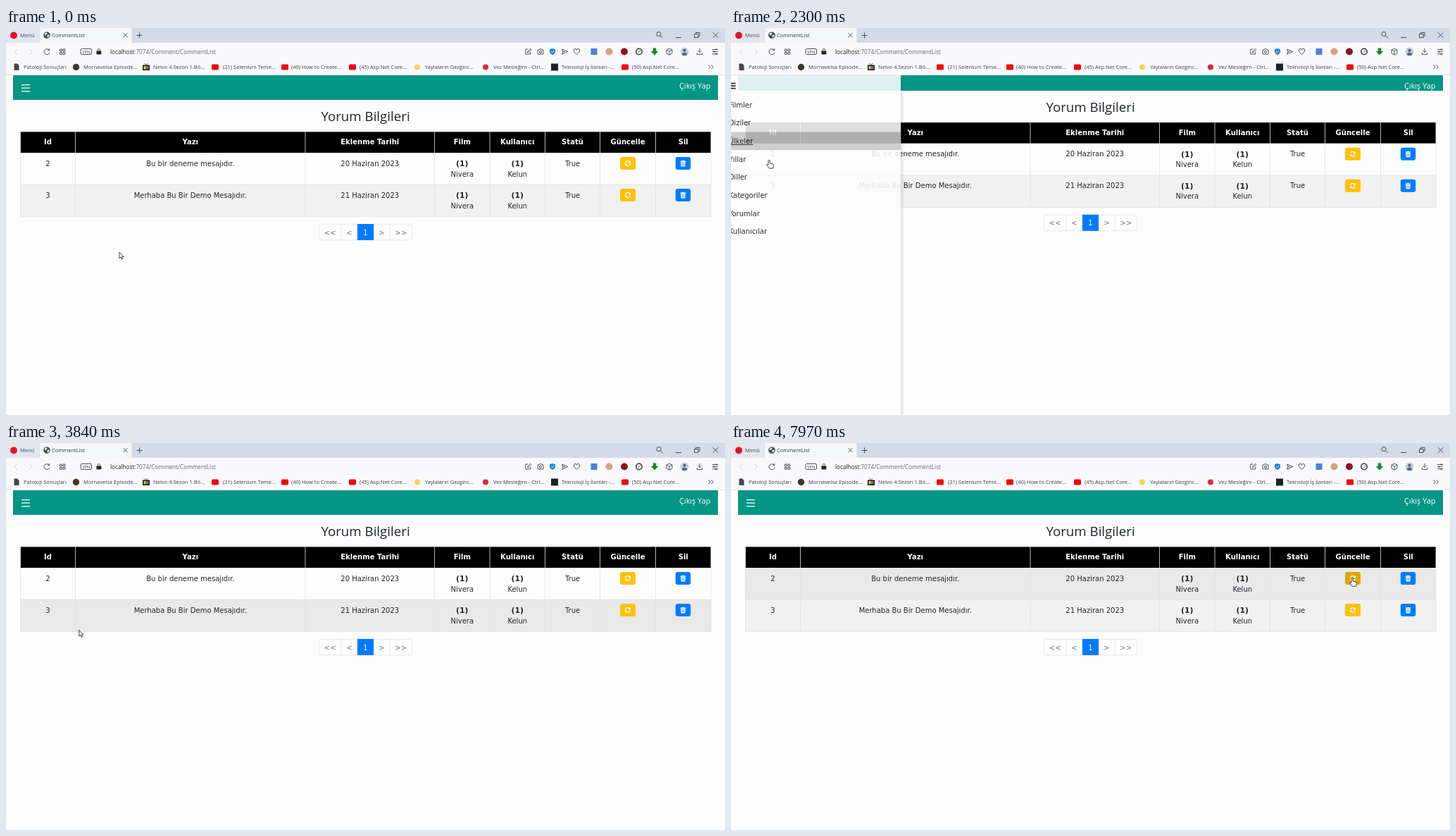
Write an HTML page that moves like this. It is 1021 px wide and 549 px high and loops after 8 s.

```html
<!DOCTYPE html>
<html lang="tr">
<head>
<meta charset="utf-8">
<title>CommentList</title>
<style>
html, body { margin: 0; width: 100%; height: 100%; overflow: hidden; background: #fdfdfd; }
svg { display: block; width: 1021px; height: 549px; }
.ui { font-family: "Open Sans", "Noto Sans", sans-serif; }
.page { font-family: "DejaVu Sans", Verdana, sans-serif; }
.line { fill: none; stroke: #3c3f45; stroke-width: .9; }
.side { filter: drop-shadow(0 1px 3px rgba(0,0,0,.28)); }
</style>
</head>
<body>
<svg id="stage" viewBox="0 0 1021 549"></svg>
<script>
const LOOP = 8000, OPEN = 2065, SLIDE = 400, RELOAD = 3650, LAG = 60;
const SHIFT = -13.2, SIDE_X = 10, SIDE_W = 255.5, ITEM_TOP = 96.2, ITEM_H = 25.65;

// time, x, y of the pointer tip
const PATH = [
  [0, 161, 318], [820, 161, 318], [870, 160, 316], [1150, 160, 316],
  [1370, 154, 204], [1750, 28, 86], [2090, 29, 87], [2240, 49, 160],
  [2300, 54, 187], [2500, 59, 236], [2800, 59, 261.5], [3750, 59, 261.5],
  [4300, 330, 285], [4800, 730, 259], [5100, 765, 248], [5650, 877, 190],
  [6040, 879, 189], [6700, 879, 189], [7000, 882, 191.5], [8000, 882, 191.5]
];
const COLS = [20.5, 98.5, 425, 608.5, 687, 765.5, 843.5, 922.5, 1001];
const HEADS = ['Id', 'Yazı', 'Eklenme Tarihi', 'Film', 'Kullanıcı', 'Statü', 'Güncelle', 'Sil'];
const ROWS = [
  { y: 177, h: 45, base: '#fdfdfd', cells: ['2', 'Bu bir deneme mesajıdır.', '20 Haziran 2023'] },
  { y: 222, h: 45.7, base: '#f1f1f2', cells: ['3', 'Merhaba Bu Bir Demo Mesajıdır.', '21 Haziran 2023'] }
];
const ITEMS = ['Filmler', 'Diziler', 'Ülkeler', 'Yıllar', 'Diller', 'Kategoriler', 'Yorumlar', 'Kullanıcılar'];
const MARKS = [
  [25, 'Patoloji Sonuçları'], [110, 'Mornavelsa Episode...'], [209, 'Nelvo 4.Sezon 1.Bö...'],
  [308, '(21) Selenium Teme...'], [405, '(40) How to Create...'], [502, '(45) Asp.Net Core...'],
  [595, 'Yaylaların Gezginc...'], [692, 'Vez Mesleğim - Ctrl...'],
  [789, 'Teknoloji İş İlanları -...'], [889, '(50) Asp.Net Core...']
];

const rect = (x, y, w, h, fill, more = '') =>
  `<rect x="${x}" y="${y}" width="${w}" height="${h}" fill="${fill}" ${more}/>`;
const dot = (x, y, r, fill, more = '') => `<circle cx="${x}" cy="${y}" r="${r}" fill="${fill}" ${more}/>`;
const line = (d, more = '') => `<path class="line" d="${d}" ${more}/>`;
const text = (s, x, mid, size, fill, more = '') =>
  `<text x="${x}" y="${mid + size * .36}" font-size="${size}" fill="${fill}" ${more}>${s.replace(/</g, '&lt;')}</text>`;
const centered = (s, x, mid, size, fill, more = '') =>
  text(s, x, mid, size, fill, 'text-anchor="middle" ' + more);
const middle = i => (COLS[i] + COLS[i + 1]) / 2;

function tabBar() {
  return rect(0, 0, 1021, 21, '#d3dbe8') + rect(0, 0, 47.5, 21, '#e2e6ee') + rect(48, 0, 130.5, 21, '#f5f6f9') +
    dot(11, 10.5, 5, '#e0142c') + text('Menü', 20, 10.5, 7.7, '#4a4d55') +
    dot(58, 10.2, 4.8, '#45484d') +
    '<path d="M55 7.5l2.5-1.2 1 1.4-1.6 2.2-2 .4zM58.5 10l2.6-.4.6 1.6-2 2.6-1.2-1.4z" fill="#e4e6ea"/>' +
    text('CommentList', 65, 10.5, 7.5, '#33363b') +
    line('M166.5 7.2l6 6m0-6l-6 6M189.5 6.5v8m-4-4h8') +
    line('M929.2 10.8l3.5 3.5') + dot(927, 8.6, 3.1, 'none', 'class="line"') +
    line('M951 13.5h8M977.5 8.500h5.5v5h-5.5zM979.5 8.5v-2h5.5v5h-2M1003.8 6.3l7.6 7.6m0-7.6l-7.6 7.6');
}

function toolBar() {
  const light = 'style="stroke:#c9cbd0"';
  return rect(0, 21, 1021, 46, '#f9f9fb') + rect(0, 66.3, 1021, .8, '#dcdde1') +
    line('M16 29.5l-4 4 4 4M33.5 29.5l4 4-4 4', light) +
    line('M61.2 31.3a4 4 0 1 0 .7 3.2M61.7 29v2.7h-2.7') +
    line('M76.5 30h2.8v2.8h-2.8zM81 30h2.8v2.8H81zM76.5 34.5h2.8v2.8h-2.8zM81 34.5h2.8v2.8H81z') +
    '<rect class="line" x="106" y="29.5" width="15.5" height="8" rx="1.5"/>' +
    centered('VPN', 113.7, 33.6, 5.6, '#3c3f45') +
    rect(128.5, 32.5, 6.8, 5, '#222', 'rx=".8"') + line('M130 33v-1.5a1.9 1.9 0 0 1 3.8 0v1.5') +
    text('localhost', 148, 33.7, 8.2, '#222') +
    text(':7074/Comment/CommentList', 298, 33.7, 8.2, '#666a70', 'text-anchor="end"') +
    line('M741 30h-3.2v7h7v-3M740.5 34.8l.4-1.8 3.6-3.7 1.4 1.4-3.6 3.7z') +
    line('M755 31h2l.8-1.3h2.4l.8 1.3h2v6h-8z') + dot(759, 33.8, 1.6, 'none', 'class="line"') +
    '<path d="M776 29l4 1.3v3.2q-.4 3-4 4.7-3.6-1.7-4-4.7v-3.2z" fill="#1689e8"/>' +
    line('M774.2 33.3l1.4 1.5 2.4-2.8', 'style="stroke:#fff"') +
    line('M789.5 30l8.3 3.6-8.3 3.7 1.4-3.7zM791 33.6h3') +
    line('M810.5 37.5q-4.3-3-4.3-5.5a2.1 2.1 0 0 1 4.3-.8 2.1 2.1 0 0 1 4.3.8q0 2.5-4.3 5.5z') +
    rect(822, 28, .7, 11, '#dfe0e4') +
    rect(830.5, 29, 9, 9, '#4a80dc') + dot(856.5, 33.5, 5, '#d5a283') + dot(878, 33.5, 5, '#8c1420') +
    dot(899, 33.5, 4.2, 'none', 'style="stroke:#30343a;stroke-width:1.5"') + line('M898 35l3-3.5') +
    '<path d="M918.7 28.5h4.6v4.5h3l-5.3 5.5-5.3-5.5h3z" fill="#16862a"/>' +
    line('M942 29l4 2v5l-4 2.2-4-2.2v-5zM938 31l4 2.2 4-2.2M942 33.2v5') +
    dot(963.5, 33.5, 6, '#c9d2e2') + dot(963.5, 31.8, 2.2, '#59677d') +
    '<path d="M959.5 37.8q.5-3 4-3t4 3q-4 3-8 0z" fill="#59677d"/>' +
    line('M985 29v5.5m-2.5-2.3l2.5 2.5 2.5-2.5M981.3 35v2.5h7.4V35') +
    line('M1003 30.5h8M1003 33.7h8M1003 36.9h8') +
    [1008.5, 1005.5, 1008.5].map((x, i) => dot(x, 30.5 + i * 3.2, 1.1, '#3c3f45')).join('');
}

function bookmarks() {
  const red = [297, 396, 492, 879].map(x => rect(x - 5, 51.5, 10, 8, '#f00a12', 'rx="1.5"')).join('');
  return '<path d="M11.5 50.5h4.5l2.5 2.5v7h-7z" fill="#44474c"/>' +
    dot(99.5, 55.5, 4.7, '#43352c') +
    rect(194, 52.5, 10, 7.5, '#151515') + line('M196.5 50l2.3 2.5 2.5-2.5') +
    ['#e8cf2c', '#31b56b', '#d83c9b'].map((c, i) => rect(195.5 + i * 2.4, 54, 2.4, 4.5, c)).join('') +
    red + dot(584, 55.5, 4, '#f6d45c') + dot(681, 55.5, 4, '#dd2b35') + rect(774, 50.5, 10, 10, '#17242a') +
    MARKS.map(([x, s]) => text(s, x, 55.5, 7.55, '#3c3f45')).join('') +
    line('M997.5 52.5l2.8 2.8-2.8 2.8M1001.5 52.5l2.8 2.8-2.8 2.8');
}

function refreshIcon(x, y) {
  return `<g transform="translate(${x} ${y})"><path d="M-3.4-.7a3.5 3.5 0 0 1 6-1.6M3.4.7a3.5 3.5 0 0 1-6 1.6" fill="none" stroke="#fff" stroke-width="1.3"/>
    <path d="M4-4v3.4H.6zM-4 4V.6h3.4z" fill="#fff"/></g>`;
}

function trashIcon(x, y) {
  return `<g transform="translate(${x} ${y})"><path d="M-4-3.4h2.4l.6-.9h2l.6.9H4v1.1h-8zM-3.3-1.7h6.6L2.9 4.4h-5.8z" fill="#fff"/>
    <path d="M-1.5-.6v3.8M0-.6v3.8M1.5-.6v3.8" stroke="#007bff" stroke-width=".6"/></g>`;
}

function tableRow(row, n) {
  const y = row.y + 15;
  const pair = (i, s) => centered('(1)', middle(i), y, 10.8, '#212529', 'font-weight="700"') +
    centered(s, middle(i), y + 15, 10, '#212529');
  return rect(20.5, row.y, 980.5, row.h, row.base, `id="row${n}"`) +
    row.cells.map((s, i) => centered(s, middle(i), y, 10, '#212529')).join('') +
    pair(3, 'Nivera') + pair(4, 'Kelun') + centered('True', middle(5), y, 10, '#212529') +
    rect(872, y - 9, 22, 18, '#ffc107', `rx="3" id="edit${n}"`) + refreshIcon(883, y) +
    rect(950.8, y - 9, 21.4, 18, '#007bff', 'rx="3"') + trashIcon(961.5, y);
}

function table() {
  return rect(20.5, 147, 980.5, 30, '#000') +
    HEADS.map((s, i) => centered(s, middle(i), 161.5, 10.05, '#fff', 'font-weight="700"')).join('') +
    ROWS.map(tableRow).join('') +
    `<path d="M20.5 147V267.7H1001V147zM20.5 222H1001${COLS.slice(1, -1).map(x => `M${x} 147V267.7`).join('')}" fill="none" stroke="#dee2e6" stroke-width=".8"/>`;
}

function pager() {
  const edges = [444.5, 476, 499, 522, 545, 576.5];
  return rect(444.5, 278.2, 132, 22.6, '#fdfdfd', 'rx="2" stroke="#dee2e6" stroke-width=".8"') +
    line(edges.slice(1, -1).map(x => `M${x} 278V301`).join(''), 'style="stroke:#dee2e6;stroke-width:.8"') +
    rect(499, 278, 23, 23, '#007bff') +
    ['<<', '<', '1', '>', '>>'].map((s, i) =>
      centered(s, (edges[i] + edges[i + 1]) / 2, 290, 10, i === 2 ? '#fff' : '#6c757d')).join('');
}

function sidebar() {
  const items = ITEMS.map((s, i) => {
    const y = ITEM_TOP + i * ITEM_H;
    return `<g class="item">${rect(SIDE_X, y, SIDE_W, ITEM_H, 'none')}${text(s, 21, y + ITEM_H / 2, 10, '#111')}</g>`;
  }).join('');
  return rect(SIDE_X, 67, SIDE_W, 500, '#fdfdfd') +
    '<path d="M21 78.6h10M21 82.1h10M21 85.6h10" stroke="#111" stroke-width="1.6"/>' + items;
}

const POINTERS = {
  plain: 'M0 0v8.8l2-1.8 1.4 3 1.4-.6-1.3-2.9h2.7z',
  hand: 'M-1.1 1.2q0-1.2 1.1-1.2t1.1 1.2v3.5l3.8.8q1.7.4 1.5 2.1l-.7 4.2h-5.5l-3.5-4.5q-.6-1.1.6-1.4l1.6 1z',
  beam: 'M-2-4.5h1.4l.6.6.6-.6H2M0-4v8M-2 4.5h1.4l.6-.6.6.6H2'
};

const stage = document.getElementById('stage');
stage.innerHTML = `
  <defs><clipPath id="view"><rect y="67" width="1021" height="482"/></clipPath></defs>
  ${rect(0, 0, 1021, 549, '#fdfdfd')}
  <g class="page" clip-path="url(#view)">
    ${rect(10, 67, 1001, 35, '#049685', 'id="nav"')}
    <path id="burger" d="M22 80.6h12M22 85.2h12M22 89.8h12" stroke="#fff" stroke-width="1.3"/>
    <g class="ui">${text('Çıkış Yap', 956, 81.8, 10.9, '#fff')}</g>
    <g id="body"><g class="ui">${centered('Yorum Bilgileri', 510.5, 125.3, 18.7, '#212529')}</g>${table()}${pager()}</g>
    <g id="side" class="side">${sidebar()}</g>
  </g>
  <g class="ui">${tabBar()}${toolBar()}${bookmarks()}</g>
  <path id="pointer" stroke="#222" stroke-width=".85" stroke-linejoin="round"/>`;

const ids = ['nav', 'burger', 'body', 'side', 'pointer', 'row0', 'row1', 'edit0', 'edit1'];
const parts = Object.fromEntries(ids.map(id => [id, document.getElementById(id)]));
const itemNodes = [...stage.querySelectorAll('.item')];

function pointerAt(t) {
  const i = Math.max(1, PATH.findIndex(p => p[0] >= t));
  const [a, b] = [PATH[i - 1], PATH[i]];
  const k = Math.max(0, (t - a[0]) / (b[0] - a[0]));
  return { x: a[1] + (b[1] - a[1]) * k, y: a[2] + (b[2] - a[2]) * k };
}

// CSS "ease": cubic-bezier(.25, .1, .25, 1)
function ease(x) {
  if (x >= 1) return 1;
  const curve = (u, p, q) => 3 * p * u * (1 - u) ** 2 + 3 * q * u * u * (1 - u) + u ** 3;
  let lo = 0, hi = 1;
  for (let i = 0; i < 20; i++) {
    const m = (lo + hi) / 2;
    if (curve(m, .25, .25) < x) lo = m; else hi = m;
  }
  return curve(lo, .1, 1);
}

const inside = (p, x, y, w, h) => p.x >= x && p.x < x + w && p.y >= y && p.y < y + h;

function draw(t) {
  const open = t >= OPEN && t < RELOAD;
  const now = pointerAt(t), past = pointerAt(Math.max(0, t - LAG));
  const shown = open ? ease((t - OPEN) / SLIDE) : 0;

  parts.nav.setAttribute('height', open ? 22 : 35);
  parts.burger.style.display = open ? 'none' : '';
  parts.body.setAttribute('transform', `translate(0 ${open ? SHIFT : 0})`);
  parts.side.style.display = open ? '' : 'none';
  parts.side.style.opacity = shown;
  parts.side.setAttribute('transform', `translate(${-200 * (1 - shown)} 0)`);

  const active = open && past.x < 265 ? Math.floor((past.y - ITEM_TOP) / ITEM_H) : -1;
  itemNodes.forEach((g, i) => {
    g.firstChild.setAttribute('fill', i === active ? '#c8c8c9' : 'none');
    g.lastChild.setAttribute('text-decoration', i === active ? 'underline' : 'none');
  });
  ROWS.forEach((r, i) => {
    const over = !open && inside(past, 20, r.y, 981, r.h);
    parts['row' + i].setAttribute('fill', over ? '#e9e9ea' : r.base);
    parts['edit' + i].setAttribute('fill', !open && inside(past, 872, r.y + 6, 22, 18) ? '#dfa706' : '#ffc107');
  });

  let kind = 'plain';
  if (open || inside(now, 18, 76, 20, 18) || inside(now, 872, 183, 22, 18)) kind = 'hand';
  else if (inside(now, 711, 231, 30, 30)) kind = 'beam';
  parts.pointer.setAttribute('d', POINTERS[kind]);
  parts.pointer.setAttribute('fill', kind === 'beam' ? 'none' : '#fff');
  parts.pointer.setAttribute('transform', `translate(${now.x} ${now.y})`);
}

function tick() {
  draw(performance.now() % LOOP);
  requestAnimationFrame(tick);
}
tick();
</script>
</body>
</html>
```
